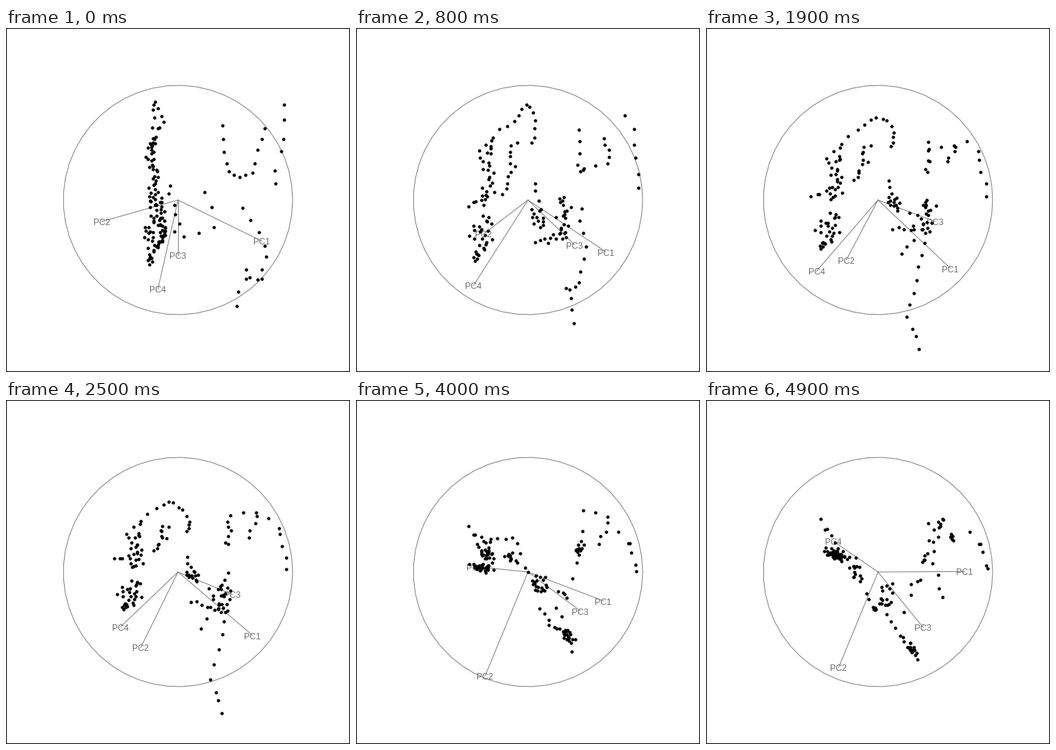
Animation, 480 px wide and 480 px high, one loop 5000 ms. Source, as a matplotlib script:

```python
import numpy as np
import matplotlib.pyplot as plt
from matplotlib.animation import FuncAnimation

SIZE, DPI, FRAMES, STEP_MS = 480, 100, 50, 100
CENTRE, RADIUS = 240, 160
LINE_GREY, TEXT_GREY = "#7f7f7f", "#6c6c6c"
PX = 72 / DPI

plt.rcParams["font.family"] = "Liberation Sans"

# Key poses of the tour: screen offsets of the four axis tips.
POSES = {
    0: [(117, 57.3), (-106, 30), (0, 77.3), (-28, 124)],
    8: [(108.5, 72.3), (-62, 47.3), (65, 62.3), (-76, 119.3)],
    13: [(102, 85.3), (-46, 63.3), (78, 45.3), (-84, 111.3)],
    25: [(104, 88.3), (-52, 105.3), (76, 31.3), (-80, 76.3)],
    33: [(108, 35.3), (-63, 136.3), (78, 74.3), (-62, 17.3)],
    40: [(105, 40.3), (-60, 145.3), (73, 54.3), (-74, -7.7)],
    49: [(121, -0.7), (-55, 133.3), (63, 77.3), (-62, -42.7)],
}
TIMES = np.array(list(POSES))
AXES = np.array(list(POSES.values()), float)
SLOPES = np.gradient(AXES, TIMES, axis=0)


def axes_at(frame):
    """Cubic Hermite interpolation of the projection."""
    i = min(np.searchsorted(TIMES, frame, side="right") - 1, len(TIMES) - 2)
    span = TIMES[i + 1] - TIMES[i]
    u = (frame - TIMES[i]) / span
    return ((2 * u**3 - 3 * u**2 + 1) * AXES[i]
            + (u**3 - 2 * u**2 + u) * span * SLOPES[i]
            + (3 * u**2 - 2 * u**3) * AXES[i + 1]
            + (u**3 - u**2) * span * SLOPES[i + 1])


def strand(rng, count, spread, *waypoints):
    """Scatter points along a path; a place is (x, y) in two views of the cloud."""
    path = np.array(waypoints, float)
    lengths = np.linalg.norm(np.diff(path, axis=0), axis=1)
    travelled = np.concatenate([[0], np.cumsum(lengths)])
    along = np.linspace(0, travelled[-1], count)
    points = np.column_stack([np.interp(along, travelled, c) for c in path.T])
    across = np.clip(rng.normal(size=(count, 1)), -1.7, 1.7)
    sideways = across * [spread[0], 0, spread[1], 0]
    return points + sideways + rng.normal(scale=1.6, size=(count, 4))


def make_cloud():
    rng = np.random.default_rng(12)
    strands = [
        # left clusters
        strand(rng, 28, (6, 9), (201, 265, 174, 253), (203, 329, 170, 293)),
        strand(rng, 22, (4, 6), (205, 160, 183, 186), (203, 248, 181, 236)),
        strand(rng, 5, (0, 0), (207, 252, 150, 222), (208, 240, 180, 217)),
        strand(rng, 11, (3, 4), (205, 158, 221, 175), (207, 240, 209, 209)),
        # arch over the top
        strand(rng, 16, (0, 0), (199, 167, 168, 188), (219, 130, 220, 143),
               (208, 100, 243, 148), (205, 125, 256, 166), (203, 162, 253, 184)),
        # middle and tail
        strand(rng, 9, (3, 5), (214, 262, 258, 241), (219, 290, 262, 250)),
        strand(rng, 6, (5, 3), (232, 220, 256, 220), (235, 285, 263, 252)),
        strand(rng, 18, (1, 6), (217, 236, 303, 257), (218, 300, 298, 297)),
        strand(rng, 6, (0, 0), (212, 308, 258, 282), (220, 290, 295, 290)),
        strand(rng, 5, (0, 0), (277, 228, 285, 262), (291, 280, 292, 292),
               (247, 294, 273, 318)),
        # right side, upper then lower
        strand(rng, 6, (0, 0), (387, 106, 366, 165), (388, 141, 382, 180),
               (375, 218, 393, 235)),
        strand(rng, 13, (0, 0), (301, 139, 310, 170), (309, 200, 307, 205),
               (328, 208, 317, 158), (345, 198, 352, 158), (361, 140, 335, 190)),
        strand(rng, 13, (2, 2), (328, 251, 306, 240), (364, 305, 314, 275),
               (358, 355, 300, 335), (332, 337, 284, 398), (325, 388, 303, 436)),
    ]
    both_views = np.hstack([axes_at(0), axes_at(25)])
    return (np.vstack(strands) - CENTRE) @ np.linalg.inv(both_views)


CLOUD = make_cloud()

fig = plt.figure(figsize=(SIZE / DPI, SIZE / DPI), dpi=DPI, facecolor="white")
ax = fig.add_axes([0, 0, 1, 1])
ax.set(xlim=(0, SIZE), ylim=(SIZE, 0))
ax.axis("off")

ax.add_patch(plt.Rectangle((0.5, 0.5), SIZE - 1, SIZE - 1, fill=False,
                           edgecolor="black", linewidth=PX, snap=False))
theta = np.linspace(0, 2 * np.pi, 50)
ring = CENTRE + RADIUS * np.column_stack([np.cos(theta), np.sin(theta)])
ax.add_patch(plt.Polygon(ring[:-1], fill=False, edgecolor=LINE_GREY, linewidth=PX))

spokes = [ax.plot([], [], color=LINE_GREY, linewidth=PX)[0] for _ in range(4)]
labels = [ax.text(0, 0, f"PC{k + 1}", color=TEXT_GREY, fontsize=12 * PX, ha="center",
                  va="baseline", zorder=2.5) for k in range(4)]
dots = ax.scatter(*np.zeros((2, len(CLOUD))), s=(4.6 * PX) ** 2, color="black",
                  linewidths=0, zorder=3)


def draw(frame):
    axes = axes_at(frame)
    for spoke, label, (x, y) in zip(spokes, labels, axes + CENTRE):
        spoke.set_data([CENTRE, x], [CENTRE, y])
        label.set_position((x, y + 5.2))
    dots.set_offsets(CLOUD @ axes + CENTRE)
    return [*spokes, *labels, dots]


anim = FuncAnimation(fig, draw, frames=FRAMES, interval=STEP_MS, repeat=True,
                     repeat_delay=0, blit=False)
plt.show()
```
